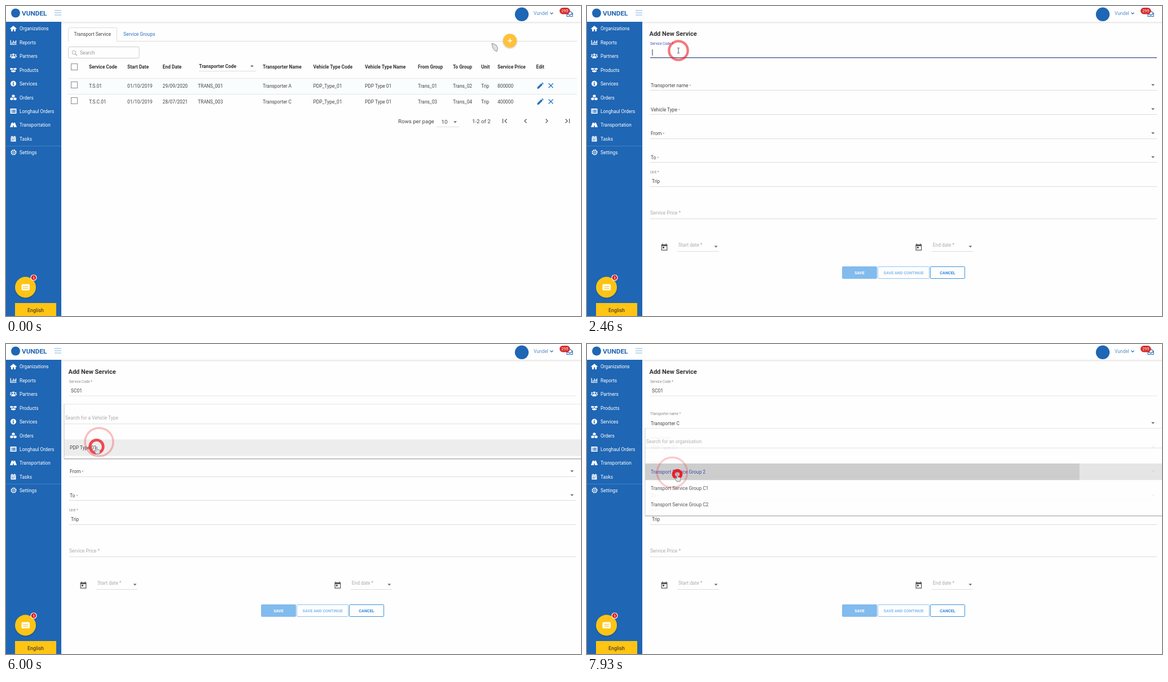
These frames come from a looping animation (1019 by 550 pixels, 8 s). An HTML page:

```html
<!DOCTYPE html>
<html lang="en">
<head>
<meta charset="utf-8">
<title>Add new service</title>
<style>
html, body { margin: 0; width: 100%; height: 100%; overflow: hidden; background: #fefefe; }
svg { display: block; width: 100%; height: 100%; }
text { font-family: Roboto, sans-serif; }
</style>
</head>
<body>
<svg id="stage" viewBox="0 0 1019 550">
  <defs>
    <linearGradient id="fall" x2="0" y2="1">
      <stop stop-color="#e6e6e6"/><stop offset="1" stop-color="#fefefe"/>
    </linearGradient>
    <filter id="soft" x="-50%" y="-50%" width="200%" height="200%">
      <feDropShadow dx="0" dy="1.2" stdDeviation="1.2" flood-opacity=".28"/>
    </filter>
    <filter id="glow" x="-50%" y="-50%" width="200%" height="200%"><feGaussianBlur stdDeviation=".6"/></filter>
  </defs>
  <rect width="1019" height="550" fill="#fefefe"/>
  <g id="list"></g>
  <g id="form"></g>
  <g id="chrome"></g>
  <g id="live"></g>
</svg>
<script>
const byId = id => document.getElementById(id);
const clamp = v => Math.max(0, Math.min(1, v));
const mix = (a, b, p) => a + (b - a) * p;

// SVG helpers; text is placed by the middle of its capitals
const text = (x, y, s, fill = '#444', size = 8.4, extra = '') =>
  `<text x="${x}" y="${y}" dy=".355em" font-size="${size}" fill="${fill}" ${extra}>${s}</text>`;
const bold = (x, y, s, fill = '#333', size = 8.4, extra = '') =>
  text(x, y, s, fill, size, `font-weight="700" ${extra}`);
const rect = (x, y, w, h, fill, extra = '') =>
  `<rect x="${x}" y="${y}" width="${w}" height="${h}" fill="${fill}" ${extra}/>`;
const circle = (x, y, r, fill, extra = '') => `<circle cx="${x}" cy="${y}" r="${r}" fill="${fill}" ${extra}/>`;
const path = (x, y, d, fill, extra = '') => `<path transform="translate(${x} ${y})" d="${d}" fill="${fill}" ${extra}/>`;
const stroke = (x, y, d, color, width = 1) => path(x, y, d, 'none', `stroke="${color}" stroke-width="${width}"`);
const rule = (x1, x2, y, color = '#dcdcdc', h = 1) => rect(x1, y, x2 - x1, h, color);
const caretDown = (x, y, fill = '#666') => path(x, y, 'M-3-1.5H3L0 1.5z', fill);
const middle = 'text-anchor="middle"';

const PAGE = '#fefefe', BLUE = '#1f66b4', INDIGO = '#3f51b5', GREY = '#aaa';

function chrome() {
  const menu = [
    ['Organizations', 'M-6 0 0-5 6 0 5 1 4 .2V5H1V1.5H-1V5H-4V.2L-5 1z'],
    ['Reports', 'M-5.5-4h1.3V3H5.5V4.2h-11zM-3 0h1.6v2H-3zM-.5-3H1V2H-.5zM2-1.5h1.4V2H2zM4-3.5h1.2V2H4z'],
    ['Partners', 'M-2-2.5a2 2 0 1 1 4 0a2 2 0 1 1-4 0M-3.5 4V2Q-3.5 0 0 0T3.5 2V4zM-5.5-2a1.3 1.3 0 1 1 2.6 0a1.3 1.3 0 1 1-2.6 0M2.9-2a1.3 1.3 0 1 1 2.6 0a1.3 1.3 0 1 1-2.6 0M-6 2V0h2.5L-4 2zM6 2V0H3.5L4 2z'],
    ['Products', 'M-5-3.5 0-2.5 5-3.5 6-.8 2 .5 0-2 -2 .5-6-.8zM-4 1-1.5 1.5 0-.2 1.5 1.5 4 1V3.3L0 4.5-4 3.3z'],
    ['Services', 'M-5 0a5 5 0 1 1 10 0a5 5 0 1 1-10 0M-.9-3v1.6H.9V-3zM-1.3-.6V.4h.6V2h-.6V3H1.3V2H.8V-.6z'],
    ['Orders', 'M0-5 2.5-4V-1L0 0-2.5-1V-4zM-3 0-.4 1V4L-3 5-5.6 4V1zM3 0 5.6 1V4L3 5 .4 4V1z'],
    ['Longhaul Orders', 'M-5.5-4.5h11v9h-11zM-4-2.5v1.2h1.2V-2.5zM-2-2.5v1.2H4V-2.5zM-4-.5V.7h1.2V-.5zM-2-.5V.7H4V-.5zM-4 1.5v1.2h1.2V1.5zM-2 1.5v1.2H4V1.5z'],
    ['Transportation', 'M-3-4H-.5V-2H.5V-4H3L6 4H.8V1H-.8V4H-6z'],
    ['Tasks', 'M-4.5-3.8H-3V-5h1.5v1.2h3V-5H3v1.2H4.5V-2h-9zM-4.5-1.4h9V5h-9zM-3 0v1.3h1.5V0zM-.7 0v1.3H.7V0zM1.5 0v1.3H3V0zM-3 2.3v1.3h1.5V2.3zM-.7 2.3v1.3H.7V2.3z'],
    ['Settings', '']
  ];
  const items = menu.map(([name, icon], i) => {
    const y = 40.3 + i * 24.43;
    const mark = icon ? path(13, y - .3, icon, '#fff', 'fill-rule="evenodd"')
      : circle(13.5, y - .5, 4.4, 'none', 'stroke="#fff" stroke-width="1.4" stroke-dasharray="2.1 1.35"')
        + circle(13.5, y - .5, 3.7, 'none', 'stroke="#fff"') + circle(13.5, y - .5, 1.5, 'none', 'stroke="#fff"');
    return mark + text(24, y + .2, name, '#fff');
  }).join('');
  return rect(0, 28, 1019, 4, 'url(#fall)') + rect(0, 0, 1019, 28, '#fff')
    + circle(17, 12.5, 8, BLUE) + bold(28, 12.5, 'VUNDEL', BLUE, 11.8)
    + [8, 12, 16].map(y => rule(86, 98, y - .5, '#7fb0de')).join('')
    + circle(914, 14.8, 12.2, BLUE)
    + text(935, 13, 'Vundel', '#5c8fc8') + stroke(967, 12.8, 'M-2.5-1.2 0 1.3 2.5-1.2', BLUE, 1.3)
    + stroke(999, 14, 'M-5-1.5V4.5H5V-1.5L0-5zM-5-1 0 2.5 5-1', BLUE, 1.1)
    + rect(981, 3, 18.5, 11.5, '#d32f2f', 'rx="5.7"') + text(990.2, 8.7, '295', '#fff', 7, middle)
    + rect(0, 28, 98, 522, BLUE) + rule(0, 98, 248, '#4383c4') + items
    + circle(34.5, 499, 18.5, '#fdc415', 'filter="url(#soft)"')
    + rect(27.5, 493.5, 14.5, 11, '#fff', 'rx="2"')
    + rule(30, 39.5, 496.8, '#fdc415', 1.2) + rule(30, 39.5, 500, '#fdc415', 1.2)
    + circle(49, 482, 5, '#e01b1b', 'stroke="#fff" stroke-width="1.2"') + bold(49, 482.2, '1', '#fff', 6.5, middle)
    + rect(16, 527, 73, 23, '#ffc414') + text(52.5, 539.5, 'English', '#222', 9, middle);
}

function listPage() {
  const columns = [147, 215, 277.5, 340, 455, 544.5, 636, 730, 792, 842, 871];
  const heads = ['Service Code', 'Start Date', 'End Date', '', 'Transporter Name', 'Vehicle Type Code',
    'Vehicle Type Name', 'From Group', 'To Group', 'Unit', 'Service Price'];
  const rows = [
    ['T.S.01', '01/10/2019', '29/09/2020', 'TRANS_001', 'Transporter A', 'PDP_Type_01', 'PDP Type 01', 'Trans_01', 'Trans_02', 'Trip', '800000'],
    ['T.S.C.01', '01/10/2019', '28/07/2021', 'TRANS_003', 'Transporter C', 'PDP_Type_01', 'PDP Type 01', 'Trans_03', 'Trans_04', 'Trip', '400000']
  ];
  const box = y => rect(115.5, y - 5.5, 11, 11, PAGE, 'stroke="#8a8a8a"');
  const body = rows.map((row, i) => {
    const y = 142.3 + i * 28.2;
    return box(140 + i * 28) + row.map((s, c) => text(columns[c], y, s)).join('')
      + path(947, y - 1, 'M-5.5 5.5V3L1.5-4 4-1.5-3 5.5zM2.3-4.7 3.5-5.7 5.8-3.5 4.7-2.3z', '#2672c0')
      + stroke(965.5, y - 1, 'M-4-4 4 4M4-4-4 4', '#2672c0', 1.3);
  }).join('');
  return rule(110, 1012, 62) + rect(110.5, 38.5, 86, 25, PAGE, 'stroke="#ddd" rx="2"') + rect(110, 63, 88, 2, PAGE)
    + text(120.5, 50, 'Transport Service') + text(208, 50, 'Service Groups', '#2b72c0')
    + rect(110.5, 72.5, 125.5, 20, PAGE, 'stroke="#ccc" rx="2"')
    + circle(120.5, 82.5, 3.3, 'none', 'stroke="#aaa"') + stroke(123, 85, 'M0 0 3 3', GREY, 1.3) + text(131, 82.8, 'Search', '#999', 8.6)
    + rect(110, 128, 902, 28, '#f9fdfe') + rule(110, 1012, 128, '#e6e6e6') + rule(110, 1012, 156, '#e6e6e6')
    + box(108) + heads.map((s, c) => bold(columns[c], 107.8, s)).join('') + bold(939.5, 107.8, 'Edit')
    + bold(342, 107.3, 'Transporter Code') + caretDown(436, 107) + rule(342, 443, 115) + body
    + text(695, 205, 'Rows per page', '#444', 9.7) + text(771.5, 206, '10', '#444', 9.7)
    + caretDown(796, 206) + rule(763, 803, 214) + text(826, 205, '1-2 of 2', '#444', 9.7)
    + stroke(884, 204, 'M-3.5-4V4M3.5-3.5 0 0 3.5 3.5', '#555', 1.2) + stroke(921, 204, 'M1.5-3.5-2 0 1.5 3.5', '#555', 1.2)
    + stroke(958, 204, 'M-1.5-3.5 2 0-1.5 3.5', '#555', 1.2) + stroke(995, 204, 'M3.5-4V4M-3.5-3.5 0 0-3.5 3.5', '#555', 1.2)
    + circle(893, 61.5, 12.2, '#ffc13a', 'filter="url(#soft)"') + stroke(893, 61.5, 'M-4 0H4M0-4V4', '#fff', 1.4);
}

function formPage() {
  const date = (x, label) =>
    path(x, 427.7, 'M-5.4-4.8H-4V-6.2h1.3V-4.8H2.7V-6.2H4V-4.8H5.4V6H-5.4zM-4.2-1.8V4.8H4.2V-1.8zM-3-.6H0V2.4H-3z', '#555', 'fill-rule="evenodd"')
    + text(x + 25, 424.5, label, GREY) + rule(x + 23, x + 96.5, 435) + caretDown(x + 91.5, 427);
  const button = (x, w, label, edge, ink, fill) =>
    rect(x + .5, 462.5, w, 21, fill, `stroke="${edge}" rx="1"`) + bold(x + .5 + w / 2, 473, label, ink, 7.2, middle);
  return bold(110.5, 49.5, 'Add New Service', '#333', 11)
    + text(112, 295, 'Unit *', '#888', 6.3) + text(115, 311.3, 'Trip') + rule(112, 1010, 320)
    + text(112, 367, 'Service Price *', GREY) + rule(112, 1010, 377)
    + date(137, 'Start date *') + date(587.8, 'End date *')
    + button(452, 61, 'SAVE', '#82bbed', '#fff', '#82bbed')
    + button(515, 91, 'SAVE AND CONTINUE', '#90c2ee', '#85bbea', PAGE)
    + button(608, 61, 'CANCEL', '#3a90da', '#3089dc', PAGE);
}

const FORM_AT = 933, FOCUS = 2000, BLUR = 4466, NEVER = 1e9;
const selects = [
  { y: 141, label: 'Transporter name', open: BLUR, pick: 5200, hint: 'Search for a transporter', items: ['Transporter A', 'Transporter C'], choice: 1, reach: 786 },
  { y: 183.8, label: 'Vehicle Type', open: 5733, pick: 6400, hint: 'Search for a Vehicle Type', items: ['PDP Type 01'], choice: 0, reach: 820 },
  { y: 226.5, label: 'From', open: 7066, pick: 7866, hint: 'Search for an organisation', choice: 0, reach: 869,
    items: ['Transport Service Group 2', 'Transport Service Group C1', 'Transport Service Group C2'] },
  { y: 269, label: 'To', open: NEVER, pick: NEVER }
];
const clicks = [[800, 891, 60], [FOCUS, 162, 79], [BLUR, 160, 147], [5200, 165, 174],
  [5733, 160.5, 182], [6400, 161, 183], [7066, 151, 228], [7866, 160, 231]];
const route = [[0, 861, 66], [100, 861, 66], [466, 891, 60], [950, 891, 60], [1466, 157, 74], [1600, 162, 79], [3900, 162, 79],
  [4333, 160, 147], [4666, 160, 147], [5133, 166, 173], [5300, 166, 173], [5600, 160.5, 182],
  [6533, 160.5, 182], [6933, 151, 228], [7200, 151, 228], [7733, 160, 231], [8000, 160, 231]];
const shapes = [[0, 'arrow'], [600, 'hand'], [1000, 'arrow'], [1550, 'beam'], [4000, 'arrow'], [4250, 'hand'], [4733, 'arrow'], [5450, 'hand']];
const keys = [[2533, 121], [2700, 125.5], [3460, 130.5], [3600, 135.5]];

function pointer(t) {
  const i = route.findIndex(p => p[0] > t);
  const [t0, x0, y0] = route[i - 1], [t1, x1, y1] = route[i];
  const p = (t - t0) / (t1 - t0), e = p * p * (3 - 2 * p);
  return [mix(x0, x1, e), mix(y0, y1, e)];
}

function cursor(t, x, y) {
  const shape = shapes.filter(s => s[0] <= t).pop()[1];
  if (shape === 'beam') return stroke(x, y, 'M-2-4.5H-.5L0-4 .5-4.5H2M0-4V4M-2 4.5H-.5L0 4 .5 4.5H2', '#555');
  const d = shape === 'arrow' ? 'M0 0 8 3.5 10.5 9 9 14.5 5 13 1.5 8z'
    : 'M-1 1Q0-1 1 1V5L5 6Q6.5 6.5 6 9L5 13H-1L-4 8Q-4.5 6-2.5 7L-1 8z';
  return path(x, y, d, '#dde1e4', 'stroke="#80868c" stroke-width=".9" stroke-linejoin="round"');
}

function serviceCode(t) {
  const p = clamp((t - FOCUS) / 200), focused = t >= FOCUS && t < BLUR;
  const typed = keys.filter(k => k[0] <= t), last = typed[typed.length - 1] || [FOCUS, 115.5];
  const star = focused ? '<tspan fill="#d33">*</tspan>' : '*';
  const color = focused ? INDIGO : t < FOCUS ? GREY : '#888';
  const caret = focused && t < 3900 && (t - last[0]) % 1000 < 500;
  return text(112, mix(81, 66.3, p), `Service Code ${star}`, color, mix(8.4, 6.3, p))
    + text(115, 82.8, 'SC01'.slice(0, typed.length)) + (caret ? rect(last[1], 77, 1, 11, '#333') : '')
    + (focused ? rule(112, 1010, 91, '#3b5485', 1.3) : rule(112, 1010, 91.5, t < FOCUS ? '#dcdcdc' : '#e8e8e8'));
}

function selectField(f, t) {
  const p = clamp((t - f.open) / 80), active = t >= f.open && t < f.pick, done = t >= f.pick;
  const star = `<tspan font-size="6.3" fill="${active ? '#d33' : '#999'}">*</tspan>`;
  return text(mix(113, 112, p), mix(f.y - .2, f.y - 17, p), `${f.label} ${star}`, done ? '#888' : '#444', mix(8.4, 6.3, p))
    + (done ? text(113, f.y + .3, f.items[f.choice]) : '')
    + caretDown(1003, f.y - .7) + rule(112, 1010, Math.floor(f.y + 8.5));
}

function panel(f, t, pointerY) {
  const age = t - f.open, gone = (t - f.pick) / 330;
  if (age < 0 || gone >= 1) return '';
  const leaving = gone > 0 ? 1 - gone ** 1.5 : 1;
  const shown = clamp((age - 67) / 180) * leaving, scale = mix(.9, 1, clamp(age / 200));
  const top = f.y - 77, bottom = f.y + (f.items.length - 1) * 29.3 + 20;
  const rows = f.items.map((s, i) => {
    const y = f.y + i * 29.3, picked = t >= f.pick && i === f.choice;
    const hover = Math.abs(pointerY - y) < 14.6;
    const back = picked ? '#e3e3e3' : hover ? '#ededed' : 'none';
    const ripple = picked ? rect(103, y - 14.5, Math.min(916, (f.reach - 103) * (t - f.pick) / 67), 29.3, '#c9c9c9') : '';
    return rect(103, y - 14.5, 916, 29.3, back) + ripple + text(113, y + .3, s, picked ? INDIGO : '#444');
  }).join('');
  const edge = (d, color, w) => stroke(0, 0, d, color, w);
  return `<g transform="translate(0 ${f.y}) scale(1 ${scale}) translate(0 ${-f.y})">
    <g opacity="${shown}">${rect(103, top, 916, bottom - top, PAGE)}${text(105, f.y - 53, f.hint, GREY)}
    ${rule(103, 1019, f.y - 42.5, '#dedede')}${rows}</g>
    <g opacity="${leaving}">${edge(`M103 ${top}H1019`, '#e6e6e6', 1)}${edge(`M103 ${top}V${bottom}`, '#c8c8c8', 1)}
    ${edge(`M103 ${bottom}H1019`, '#b0b0b0', 1.5)}</g></g>`;
}

function ring([at, x, y], t) {
  const age = t - at;
  if (age < 0 || age > 930) return '';
  const r = 5 + age / 40, width = mix(5.5, 3.5, clamp(age / 800));
  return circle(x, y, r, age < 130 ? 'rgba(255,150,150,.3)' : 'none',
    `stroke="#f0141e" stroke-width="${width}" opacity="${1 - age / 1100}" filter="url(#glow)"`);
}

byId('chrome').innerHTML = chrome();
byId('list').innerHTML = listPage();
byId('form').innerHTML = formPage();

const STEP = 1000 / 15, LOOP = 8000, start = performance.now();
let shownStep = -1;

function render() {
  const step = Math.floor(((performance.now() - start) % LOOP + 7) / STEP) % 120;
  if (step !== shownStep) {
    shownStep = step;
    const t = step * STEP, [x, y] = pointer(t), onForm = t >= FORM_AT;
    byId('list').style.display = onForm ? 'none' : '';
    byId('form').style.display = onForm ? '' : 'none';
    const fields = onForm ? serviceCode(t) + selects.map(f => selectField(f, t)).join('')
      + selects.map(f => panel(f, t, y)).join('') : '';
    byId('live').innerHTML = fields + clicks.map(c => ring(c, t)).join('') + cursor(t, x, y);
  }
  requestAnimationFrame(render);
}
render();
</script>
</body>
</html>
```
